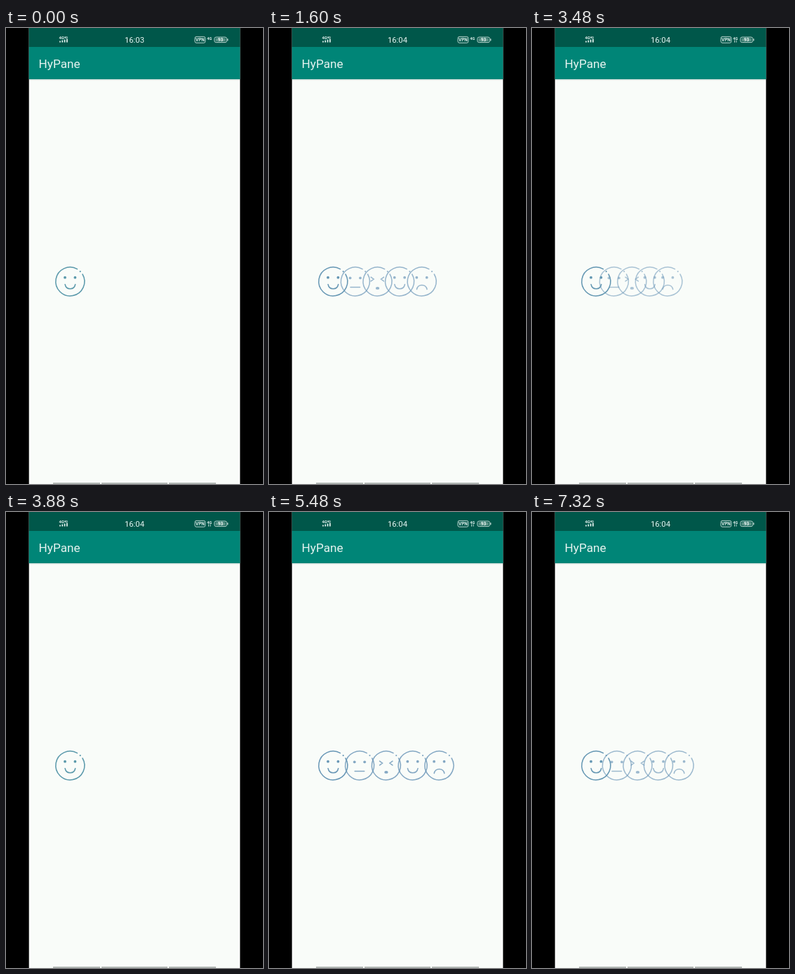
An HTML page for the animation above (7360 ms loop, 366 px wide and 650 px high).

```html
<!DOCTYPE html>
<html lang="en">
<head>
<meta charset="utf-8">
<title>Face picker</title>
<style>
  html, body { margin: 0; width: 100%; height: 100%; overflow: hidden; background: #000; }
  svg { display: block; width: 366px; height: 650px; }
  text { font-family: Roboto, sans-serif; fill: #e6f3f0; }
  .face { --ink: #6b96b8; fill: none; stroke: var(--ink); stroke-width: 1.5; stroke-linecap: round; }
  .dot { fill: var(--ink); stroke: none; }
  .icon { fill: none; stroke: #b9d3cd; }
</style>
</head>
<body>
<svg viewBox="0 0 366 650">
  <defs>
    <linearGradient id="shade" x2="0" y2="1">
      <stop stop-color="#cfdcd8"/>
      <stop offset="1" stop-color="#f9fcf9"/>
    </linearGradient>
    <g id="ring">
      <path d="M17.6-10.5A20.5 20.5 0 1 1 10.1-17.9"/>
      <circle class="dot" cx="14.3" cy="-14.4" r="1.1"/>
    </g>
    <g id="eyes">
      <circle class="dot" cx="-7.4" cy="-5.8" r="1.9"/>
      <circle class="dot" cx="7" cy="-5.8" r="1.9"/>
    </g>
    <path id="smile" d="M-7.3 4C-5.6 12.4 5.6 12.4 7.3 4"/>
  </defs>

  <rect x="32.7" width="300.6" height="650" fill="#f9fcf9"/>
  <rect x="32.7" width="300.6" height="27" fill="#00574a"/>
  <rect x="32.7" y="27" width="300.6" height="46" fill="#008577"/>
  <rect x="33" y="73" width="300" height="2.5" fill="url(#shade)"/>
  <path d="M67 649h67M136 649h94M232 649h67" stroke="#b3b8b5" stroke-width="2"/>

  <text x="75.5" y="15.5" font-size="5.6" font-weight="700">4G<tspan font-size="4" dy="-.8">HD</tspan></text>
  <path d="M77 20.5v-2M80.3 20.5v-3M83.6 20.5v-4M86.9 20.5v-5" stroke="#e6f3f0" stroke-width="1.7"/>
  <text id="clock" x="183" y="21" font-size="11.3" text-anchor="middle">16:03</text>
  <rect class="icon" x="269" y="12.4" width="14.8" height="8.8" rx="2"/>
  <text x="276.4" y="19.2" font-size="6.3" font-weight="700" text-anchor="middle">VPN</text>
  <text x="286.3" y="16.5" font-size="5.4" font-weight="700">4G</text>
  <path id="data" d="M288.5 17.5v3.2M291 17.5v3.2" stroke="#b9d3cd" visibility="hidden"/>
  <rect class="icon" x="296.8" y="13" width="17.6" height="7.6" rx="2.4"/>
  <rect x="298.4" y="14.4" width="14.4" height="4.8" rx="1" fill="#5c9287"/>
  <text x="305.6" y="19.3" font-size="6.5" font-weight="700" text-anchor="middle">93</text>
  <path d="M315.8 15.3v3" stroke="#b9d3cd" stroke-width="1.2"/>

  <text x="46.5" y="57" font-size="17.2">HyPane</text>

  <g class="face">
    <use href="#ring"/><use href="#eyes" y=".6"/>
    <path d="M-7 7.9H6.6"/>
  </g>
  <g class="face">
    <use href="#ring"/>
    <path d="M-9.4-6.4L-5.4-3.5L-9.4-.6M9-6.4L5-3.5L9-.6"/>
    <ellipse class="dot" cy="9.4" rx="2.7" ry="1.9"/>
  </g>
  <g class="face">
    <use href="#ring"/><use href="#eyes"/><use href="#smile"/>
  </g>
  <g class="face">
    <use href="#ring"/><use href="#eyes"/>
    <path d="M-7.3 11C-5.6 2.9 5.6 2.9 7.3 11"/>
  </g>
  <g class="face" id="first">
    <use href="#ring"/><use href="#eyes"/><use href="#smile"/>
  </g>
</svg>
<script>
  const LOOP = 7360, STEP = 40, SPAN = 800, GAP = 45.8;
  const $ = id => document.getElementById(id);
  const first = $('first');
  const others = [...document.querySelectorAll('.face')].filter(f => f !== first);
  const start = performance.now();

  // Accelerate, then decelerate
  const ease = (t, from) => {
    const p = Math.min(1, Math.max(0, (t - from) / SPAN));
    return (1 - Math.cos(Math.PI * p)) / 2;
  };
  const openness = t => ease(t, 1101) - ease(t, 3109) + ease(t, 4900) - ease(t, 6995);
  const mix = (a, b, k) => a + (b - a) * k;
  const place = (face, x) => face.setAttribute('transform', `translate(${x} 361.5)`);

  function draw() {
    const t = Math.floor((performance.now() - start) % LOOP / STEP) * STEP;
    const k = openness(t);
    others.forEach((face, i) => {
      place(face, 91.4 + GAP * (i + 1) * k);
      face.style.opacity = k;
    });
    first.style.setProperty('--ink', `rgb(${mix(90, 107, k)} ${mix(153, 150, k)} ${mix(171, 184, k)})`);
    $('clock').textContent = t < 80 ? '16:03' : '16:04';
    $('data').setAttribute('visibility', t < 1880 ? 'hidden' : 'visible');
    requestAnimationFrame(draw);
  }
  place(first, 91.4);
  draw();
</script>
</body>
</html>
```
